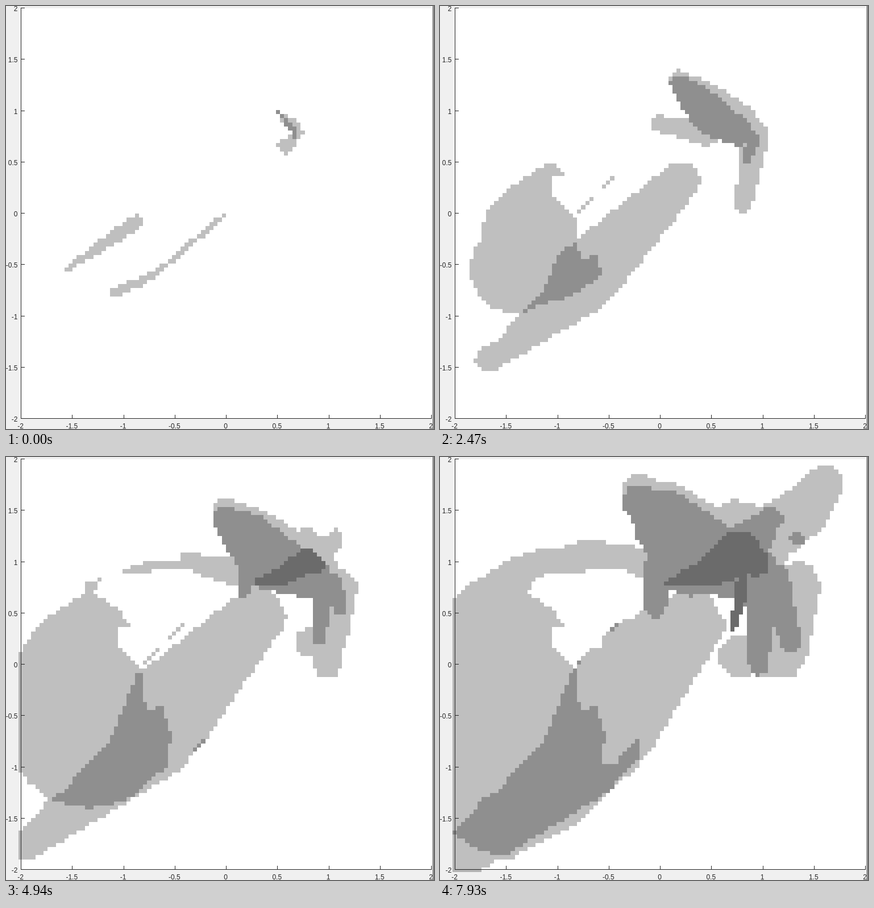
Animation, 753 px wide and 744 px high, one loop 8 s. Source, as an HTML page:

```html
<!DOCTYPE html>
<html lang="en">
<head>
<meta charset="utf-8">
<title>Growing sets</title>
<style>
html, body { margin: 0; width: 100%; height: 100%; overflow: hidden; background: #f0f0f0; }
svg { display: block; }
text { font: 12px "Liberation Sans", Arial, sans-serif; fill: #262626; }
</style>
</head>
<body>
<svg id="stage" width="753" height="744" viewBox="0 0 753 744">
  <rect x="26" y="4" width="723" height="722" fill="#fff"/>
  <g id="shades" fill="#000" fill-opacity=".25" shape-rendering="crispEdges"></g>
  <path id="axes" fill="none" stroke="#262626" shape-rendering="crispEdges"/>
  <g id="labels"></g>
  <rect x="751" width="1" height="744" fill="#111"/>
</svg>
<script>
const LOOP = 8000, STEP = 130, END = 7930, N = 100, CELL = 722 / 99;
const mix = (a, b, u) => a + (b - a) * u;

// A brush is a chain of circles [x, y, radius] that swells from one pose to another.
const brush = (from, to, start = 0, power = .68) => ({ from, to, start, power });

const leftLobe = {
  brushes: [
    brush([[107, 463, 4], [180, 413, 11], [232, 378, 12]], [[115, 460, 100], [180, 413, 228], [225, 385, 228]]),
    brush([[115, 457, 6]], [[165, 475, 235]], 0, 1),
    brush([[150, 235, 0], [260, 195, 0], [400, 195, 8]], [[150, 225, 42], [260, 190, 40], [400, 190, 28]], 3640, 1)
  ],
  limit: [[237, 372], [248, 450], [275, 435], [291, 490], [283, 538], [305, 544], [351, 490], [351, 531],
    [240, 645], [80, 730], [0, 745], [0, 100], [330, 140], [400, 165], [400, 212]]
};

const diagonalLobe = {
  brushes: [
    brush([[190, 503, 8], [235, 486, 9], [270, 465, 5], [383, 369, 4]],
      [[-18, 725, 50], [250, 490, 110], [290, 440, 110], [463, 247, 65]], 0, .6)
  ],
  limit: [[237, 365], [280, 335], [310, 290], [417, 241], [475, 243], [512, 310], [505, 420], [100, 745], [10, 745],
    [22, 665], [75, 602], [100, 590], [140, 540], [185, 495], [210, 430]]
};

const floor = [[0, 0], [753, 0], [753, 386], [0, 386]];

const lightPetals = {
  brushes: [
    brush([[479, 186, 4], [486, 194, 5], [500, 205, 10], [515, 222, 8]],
      [[352, 62, 33], [400, 105, 60], [450, 155, 80], [545, 185, 60]]),
    brush([[490, 245, 12], [500, 240, 12]], [[255, 160, 16], [430, 205, 35]]),
    brush([[512, 222, 8], [490, 250, 10]], [[600, 235, 50], [590, 470, 20]]),
    brush([[548, 230, 12], [545, 260, 12], [535, 300, 8]], [[610, 235, 60], [612, 340, 36], [525, 350, 35]], 1560, 1),
    brush([[550, 170, 8], [550, 170, 8], [545, 165, 8], [530, 150, 10]],
      [[677, 46, 32], [640, 95, 45], [575, 140, 50], [520, 122, 46]], 4000, 1)
  ],
  limit: floor
};

const mediumPetals = {
  brushes: [
    brush([[479, 187, 4], [493, 202, 5], [508, 222, 4], [508, 234, 3]],
      [[352, 80, 32], [398, 118, 58], [445, 165, 72], [545, 205, 50]]),
    brush([[548, 230, 6], [535, 245, 6]], [[565, 240, 30], [560, 368, 16]], 1560, .8),
    brush([[570, 225, 12], [575, 240, 8]], [[588, 215, 28], [617, 325, 18]], 3510, 1),
    brush([[430, 235, 6], [430, 210, 8], [460, 205, 20]], [[378, 262, 20], [385, 195, 28], [440, 200, 45]], 4000, 1),
    brush([[535, 180, 6], [535, 180, 6]], [[583, 108, 20], [530, 165, 45]], 4940, .8),
    brush([[628, 143, 0]], [[628, 143, 13]], 6500, 1)
  ],
  limit: floor
};

const darkPetals = {
  brushes: [
    brush([[480, 215, 2], [500, 212, 8], [535, 195, 4], [538, 198, 4]],
      [[402, 222, 7], [470, 205, 25], [525, 170, 42], [555, 185, 25]], 3640, .6),
    brush([[530, 235, 4], [530, 238, 4]], [[532, 225, 12], [516, 305, 5]], 5500, 1)
  ],
  limit: floor
};

// Places that stay empty.
const holes = [
  [[154, 241], [161, 219], [190, 206], [307, 197], [340, 204], [358, 215], [358, 248], [343, 284], [307, 292],
    [278, 330], [248, 352], [237, 370], [197, 328], [197, 303], [225, 303], [205, 277], [183, 256]],
  [[604, 190], [606, 182], [643, 165], [643, 180]]
];

function inside(points, x, y) {
  let hit = false;
  points.forEach(([ax, ay], k) => {
    const [bx, by] = points[(k || points.length) - 1];
    if ((ay > y) !== (by > y) && x < ax + (y - ay) / (by - ay) * (bx - ax)) hit = !hit;
  });
  return hit;
}

const centres = Array.from({ length: N * N }, (_, c) => [26 + c % N * CELL, 4 + Math.floor(c / N) * CELL]);
const open = centres.map(([x, y]) => !holes.some(h => inside(h, x, y)));
const sets = [leftLobe, diagonalLobe, lightPetals, mediumPetals, darkPetals];
for (const set of sets) set.allowed = centres.map(([x, y], c) => open[c] && inside(set.limit, x, y));

function pose({ from, to, start, power }, time) {
  const u = Math.min(1, (time - start) / (END - start)) ** power;
  return from.map((circle, k) => circle.map((v, n) => mix(v, to[k][n], u)));
}

function covers(chain, x, y) {
  return chain.some(([ax, ay, ar], k) => {
    const [bx, by, br] = chain[k + 1] || chain[k];
    const dx = bx - ax, dy = by - ay;
    const along = ((x - ax) * dx + (y - ay) * dy) / (dx * dx + dy * dy || 1);
    const h = Math.max(0, Math.min(1, along));
    return Math.hypot(x - ax - h * dx, y - ay - h * dy) <= mix(ar, br, h);
  });
}

function levelsAt(time) {
  const [left, diagonal, light, medium, dark] = sets.map(set => {
    const chains = set.brushes.filter(b => b.start <= time).map(b => pose(b, time));
    return centres.map(([x, y], c) => set.allowed[c] && chains.some(chain => covers(chain, x, y)));
  });
  return centres.map((_, c) => Math.max(left[c] + diagonal[c], light[c], medium[c] * 2, dark[c] * 3));
}

const edgeX = i => Math.round(26 + (i - .5) * CELL), edgeY = j => Math.round(4 + (j - .5) * CELL);

function cellPath(levels, least) {
  let d = "";
  for (let j = 0; j < N; j++)
    for (let i = 0; i < N; i++) {
      const first = i;
      while (i < N && levels[j * N + i] >= least) i++;
      if (i > first) d += `M${edgeX(first)} ${edgeY(j)}H${edgeX(i)}V${edgeY(j + 1)}H${edgeX(first)}Z`;
    }
  return d;
}

function add(parent, tag, attributes, text = "") {
  const node = document.createElementNS("http://www.w3.org/2000/svg", tag);
  for (const name in attributes) node.setAttribute(name, attributes[name]);
  node.textContent = text;
  return document.getElementById(parent).appendChild(node);
}

let axes = "M26.5 4V725.5H748";
for (let k = 0; k <= 8; k++) {
  const value = k / 2 - 2, x = 26 + k * 90.25, y = 726 - k * 90.25;
  axes += `M${Math.round(x) + .5} 726v-7M26 ${Math.round(y) - .5}h7`;
  add("labels", "text", { x: x - .5, y: 743, "text-anchor": "middle" }, value);
  add("labels", "text", { x: 20.5, y: y + 5, "text-anchor": "end" }, value);
}
document.getElementById("axes").setAttribute("d", axes);

const shades = [1, 2, 3].map(() => add("shades", "path", {}));
const origin = performance.now();
let shown = -1;
function draw() {
  const step = Math.floor((performance.now() - origin) % LOOP / STEP);
  if (step !== shown) {
    shown = step;
    const levels = levelsAt(step * STEP);
    shades.forEach((path, k) => path.setAttribute("d", cellPath(levels, k + 1)));
  }
  requestAnimationFrame(draw);
}
draw();
</script>
</body>
</html>
```
